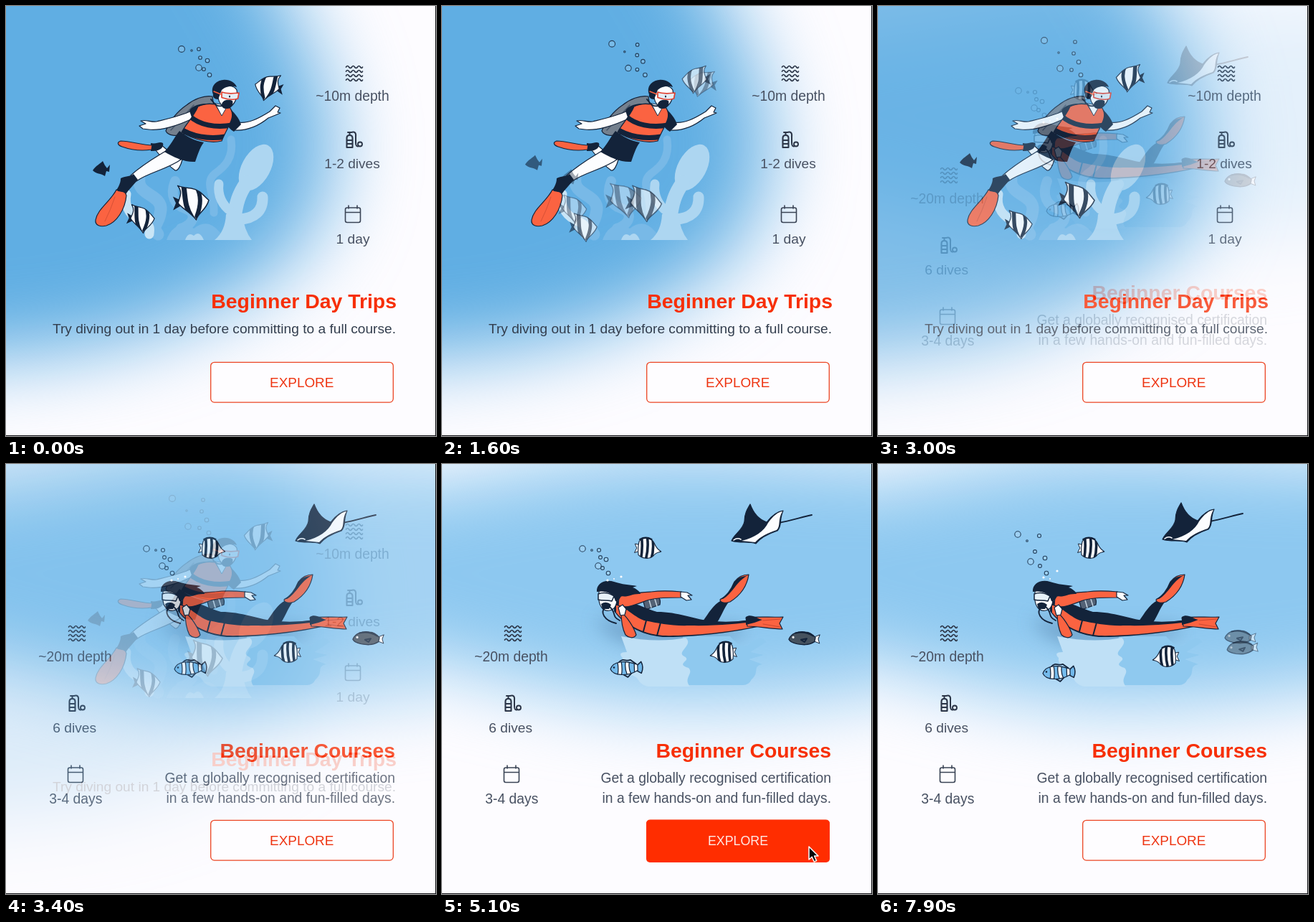
These frames come from a looping animation (600 by 599 pixels, 8 s). An HTML page with a canvas:

```html
<!DOCTYPE html>
<html lang="en">
<head>
<meta charset="utf-8">
<title>Dive trips</title>
<style>
html, body { margin: 0; width: 100%; height: 100%; overflow: hidden; background: #fdfcff; }
canvas { display: block; }
</style>
</head>
<body>
<canvas id="stage" width="600" height="599"></canvas>
<script>
const W = 600, H = 599, LOOP = 8000;
const NAVY = '#13233a', ORANGE = '#fb6341', RED = '#f72f05', WHITE = '#fcfdff', INK = '#485162';
const FONT = '"Liberation Sans", Arial, sans-serif';

const stage = document.getElementById('stage').getContext('2d');
const layer = () => Object.assign(document.createElement('canvas'), { width: W, height: H }).getContext('2d');

const clamp = v => Math.max(0, Math.min(1, v));
const lerp = (a, b, p) => a + (b - a) * p;
const ease = p => p * p * (3 - 2 * p);
const span = (t, a, b) => clamp((t - a) / (b - a));

function shape(c, d, fill, line, width = 1.2) {
  const path = new Path2D(d);
  if (fill) { c.fillStyle = fill; c.fill(path); }
  if (line) {
    c.strokeStyle = line;
    c.lineWidth = width;
    c.lineCap = c.lineJoin = 'round';
    c.stroke(path);
  }
}

function oval(c, x, y, rx, ry, fill, line, width = 1, turn = 0) {
  c.beginPath();
  c.ellipse(x, y, rx, ry, turn, 0, 7);
  if (fill) { c.fillStyle = fill; c.fill(); }
  if (line) { c.strokeStyle = line; c.lineWidth = width; c.stroke(); }
}

function text(c, s, x, y, size, color = INK, align = 'center', weight = 400) {
  c.font = `${weight} ${size}px ${FONT}`;
  c.textAlign = align;
  c.fillStyle = color;
  c.fillText(s, x, y);
}

function soft(c, d, color, blur) {
  c.save();
  c.filter = `blur(${blur}px)`;
  shape(c, d, color);
  c.restore();
}

function at(c, x, y, turn, sx, sy, alpha, draw) {
  if (alpha <= 0) return;
  c.save();
  c.globalAlpha = alpha;
  c.translate(x, y);
  c.rotate(turn);
  c.scale(sx, sy);
  draw(c);
  c.restore();
}

// ---------- interface ----------
function icons(c, dx, dy, tankDy) {
  c.save();
  c.translate(dx, dy);
  for (let row = 0; row < 4; row++) {
    shape(c, `M474.5,${85 + row * 6} q2,-3 4,0 t4,0 t4,0 t4,0 t4,0 t3,0`, null, '#2b3547', 1.7);
  }
  shape(c, 'M476,281 H492 Q494.5,281 494.5,283.5 V299 Q494.5,301.5 492,301.5 H476 Q473.5,301.5 473.5,299 V283.5 Q473.5,281 476,281 Z M473.5,287.5 H494.5 M478,278 V282 M490,278 V282', null, '#3a4455', 1.6);
  c.translate(0, tankDy);
  shape(c, 'M475.5,197 V184 Q475.5,180 479.5,180 Q483.5,180 483.5,184 V197 Z M476,187 H483 M476,192 H483', null, '#2b3547', 2.1);
  shape(c, 'M477,176 H482 M479.5,176 V180 M482,176 Q489,174 488,182 V190 Q488,197 492,195', null, '#2b3547', 2);
  oval(c, 494, 192.5, 3, 3, null, '#2b3547', 1.9);
  c.restore();
}

function button(c) {
  c.beginPath();
  c.roundRect(285.7, 496.3, 254.6, 55.8, 5);
  c.fillStyle = '#fefdff';
  c.fill();
  c.strokeStyle = '#ec4523';
  c.lineWidth = 1.3;
  c.stroke();
  text(c, 'EXPLORE', 412.7, 531.3, 18.9, '#ee3512');
}

function hotButton(c) {
  c.beginPath();
  c.roundRect(285, 495.5, 256, 59.5, 5);
  c.fillStyle = '#ff2d00';
  c.fill();
  text(c, 'EXPLORE', 413, 531.3, 17.8, '#ffe9e4');
}

function cursor(c, x, y) {
  at(c, x, y, 0, 1, 1, 1, () =>
    shape(c, 'M0,0 V18 L4.2,14.3 L7.2,21 L10.6,19.6 L7.6,13 H13 Z', '#060606', '#fff', 1.5));
}

function frameEdge(c) {
  c.fillStyle = '#15151a';
  c.fillRect(599, 0, 1, H);
  c.fillRect(0, 598, W, 1);
}

// ---------- day trip scene ----------
function reefA(c) {
  const dim = '#78b9e7', pale = '#add6f1';
  shape(c, 'M314,186 C318,212 305,224 291,234 C276,247 292,262 290,288', null, dim, 11);
  shape(c, 'M186,240 C182,264 218,262 216,284 S202,304 212,318', null, dim, 17);
  shape(c, 'M236,244 C228,264 236,278 250,282 C268,288 262,304 244,310', null, dim, 14);
  shape(c, 'M224,326 C232,304 248,300 262,310 Q282,294 299,316 V326 Z', dim);
  shape(c, 'M250,326 Q254,314 262,320 Q270,312 276,326 Z', pale);
  oval(c, 349, 225, 20, 35, pale, null, 1, 0.5);
  shape(c, 'M336,246 C326,260 320,274 318,302', null, pale, 20);
  shape(c, 'M297,248 C295,264 302,278 314,286', null, pale, 13);
  shape(c, 'M358,266 C359,286 346,296 326,297', null, pale, 15);
  shape(c, 'M291,326 Q306,314 307,290 H330 Q332,312 343,326 Z', pale);
  shape(c, 'M168,262 C164,282 176,294 190,300 S200,312 200,318', null, '#c9e5f6', 13);
}

function diverA(c) {
  shape(c, 'M223,174 C228,160 240,146 252,138 C262,130 276,124 288,126 L290,140 L250,178 C238,182 226,181 223,174 Z', '#74808e', NAVY);
  shape(c, 'M230,173 L262,138 M250,168 L270,142', null, '#46566a', 1.5);
  // rear leg
  shape(c, 'M216,193 C226,202 238,210 246,214 C244,222 240,230 236,229 C226,222 216,210 209,201 Z', WHITE, NAVY);
  shape(c, 'M202,191 C210,193 214,188 219,191 C221,197 214,203 202,202 Z', NAVY);
  shape(c, 'M204,194 C190,194 174,188 160,188 C154,190 156,194 162,196 C176,201 190,202 203,200 Z', ORANGE, NAVY);
  // front leg
  shape(c, 'M226,200 C214,208 194,218 174,236 L182,244 C198,232 224,228 244,214 Z', WHITE, NAVY);
  shape(c, 'M160,240 C168,236 174,238 178,234 L184,242 C176,252 168,258 165,267 L150,262 C156,254 160,248 160,240 Z', NAVY);
  shape(c, 'M154,256 C146,272 128,282 125,298 C124,306 132,308 140,306 C154,302 166,284 168,264 C166,256 160,260 154,256 Z', ORANGE, NAVY);
  shape(c, 'M152,266 Q146,284 138,300', null, '#cf4c33', 0.8);
  shape(c, 'M242,174 C252,182 264,188 276,190 C270,198 268,206 264,217 C250,218 234,211 221,203 C230,194 234,184 242,174 Z', NAVY);
  // arms
  shape(c, 'M259,146 C244,153 226,157 210,161 C202,162 196,158 188,160 L195,164 L186,167 L191,171 L199,172 C214,174 238,168 264,155 Z', WHITE, NAVY);
  shape(c, 'M318,173 C334,174 350,169 366,156 L376,152 L383,149 L379,148 L382,142 L376,139 L368,147 C352,157 338,164 324,162 Z', WHITE, NAVY);
  shape(c, 'M256,146 C260,137 276,135 290,136 L280,154 C270,152 264,156 259,155 Z', NAVY);
  shape(c, 'M308,140 C318,146 326,158 328,165 L318,175 C308,170 304,158 304,150 Z', NAVY);
  // vest
  const vest = 'M268,140 C276,136 286,136 292,137 L301,152 L309,138 C316,144 317,152 314,160 C310,170 304,180 301,188 C284,192 262,186 245,176 C250,166 262,154 268,140 Z';
  shape(c, vest, ORANGE, NAVY);
  c.save();
  c.clip(new Path2D(vest));
  shape(c, 'M256,153 C270,166 292,170 316,166 M242,170 C258,182 284,186 306,182', null, NAVY, 7);
  c.restore();
  shape(c, 'M292,136 L301,153 L309,139 Z', WHITE, NAVY, 0.8);
  // head
  shape(c, 'M297,116 C305,109 318,110 322,117 C324,126 319,140 309,142 C301,141 297,134 296,128 Z', WHITE, NAVY);
  shape(c, 'M289,123 C285,113 292,104 303,103 C312,102 320,107 322,113 C314,110 305,113 301,117 L296,130 C291,130 288,127 289,123 Z', NAVY);
  shape(c, 'M301,137 C303,130 311,130 316,132 C318,138 313,144 308,143 C303,143 301,141 301,137 Z', NAVY);
  shape(c, 'M301,120 C308,122.5 317,122 325,121 L323.5,129 C316,131.5 308,130 301,127.5 Z', '#e4eef6', '#e2402f', 1.7);
  shape(c, 'M290,119 L300,123', null, ORANGE, 1.5);
  oval(c, 312, 126, 1, 1.5, NAVY);
  shape(c, 'M302,139 C292,141 290,134 286,130', null, NAVY, 1.8);
}

function sceneA(c) {
  c.fillStyle = '#fdfcff';
  c.fillRect(0, 0, W, H);
  soft(c, 'M-220,-220 H260 C340,-80 452,60 456,200 C452,310 390,372 290,418 C210,456 110,498 -220,492 Z', '#60aee3', 56);
  reefA(c);
  diverA(c);
  icons(c, 0, 0, 0);
  text(c, '~10m depth', 483.5, 132, 19.3);
  text(c, '1-2 dives', 483, 226, 19.1);
  text(c, '1 day', 484, 331, 19.2);
  text(c, 'Beginner Day Trips', 545, 421, 28.4, RED, 'right', 700);
  text(c, 'Try diving out in 1 day before committing to a full course.', 544, 456, 19.15, '#333e4e', 'right');
  button(c);
  frameEdge(c);
}

// ---------- course scene ----------
function reefB(c) {
  soft(c, 'M215,215 C230,250 280,258 330,255 L420,238 L420,225 L300,225 Z', 'rgba(70,110,150,.4)', 12);
  shape(c, 'M336,240 H402 C414,254 424,258 432,248 Q446,238 452,248 L430,262 L449,266 L428,272 L447,279 C432,282 444,290 432,300 Q428,308 420,308 H330 Z', '#8fc9ef');
  shape(c, 'M250,240 Q300,250 340,242 C352,252 326,262 338,268 S324,278 344,284 C352,292 336,298 346,310 H288 C270,306 278,296 262,294 C270,284 250,284 252,270 Q244,262 258,262 Z', '#bfe0f6');
}

function diverB(c) {
  // raised leg
  shape(c, 'M364,219 C372,208 378,196 390,190 L401,191 C392,202 390,214 380,226 Z', NAVY);
  shape(c, 'M388,189 C398,184 404,174 408,164 C414,156 422,154 428,154 C426,168 418,182 402,192 C396,194 388,194 388,189 Z', ORANGE, NAVY);
  shape(c, 'M392,188 C406,180 410,164 427,155 C418,158 412,156 406,168 C402,178 396,184 388,188 Z', NAVY);
  // tank and body
  shape(c, 'M280,188 L300,184 Q306,188 304,196 L284,203 Z', '#536276', NAVY);
  shape(c, 'M288,186 L292,200 M296,185 L300,198', null, '#c4d3df', 1.5);
  shape(c, 'M240,191 C262,188 284,202 300,206 C330,206 350,216 372,218 C400,222 420,218 440,216 L440,227 C400,236 340,242 308,241 C276,238 254,224 240,205 Z', NAVY);
  shape(c, 'M243,197 C256,198 266,212 282,218 C304,222 320,226 346,225 C384,226 412,222 438,220 L438,226 C400,235 340,240 308,239 C278,236 258,224 243,207 Z', ORANGE);
  shape(c, 'M285,218 L281,233 M305,221 L300,239', null, NAVY, 2);
  shape(c, 'M424,214 C444,212 460,214 476,213 L471,222 L475,230 C460,230 440,226 426,226 Z', ORANGE, NAVY);
  shape(c, 'M424,213 C432,208 440,216 447,217 L436,221 L424,224 Z', NAVY);
  shape(c, 'M448,218 L472,216 M448,223 L472,227', null, '#bd412d', 0.8);
  // arms
  shape(c, 'M247,185 C258,180 276,179 292,178 C308,176 322,177 334,178 L334,186 C316,186 300,186 286,190 C270,196 256,202 246,197 Z', ORANGE, NAVY);
  shape(c, 'M333,178 L342,179 L349,183 L343,183 L348,189 L341,190 L333,185 Z', WHITE, NAVY);
  shape(c, 'M250,207 C258,212 268,228 271,238 C268,244 260,242 256,238 C252,230 250,218 250,207 Z', ORANGE, NAVY);
  shape(c, 'M246,200 L252,196 L257,202 L255,210 L249,211 Z', WHITE, NAVY);
  // head
  shape(c, 'M219,176 C224,170 238,172 243,182 C246,192 242,203 234,204 C225,206 220,198 219,190 Z', WHITE, NAVY);
  shape(c, 'M216,178 C215,166 228,160 240,164 C252,168 260,168 272,170 L266,172 C272,174 276,178 277,181 C266,180 260,186 250,184 C246,192 242,194 241,188 C238,180 228,176 216,178 Z', NAVY);
  shape(c, 'M218,181 C226,178 234,180 240,184 L237,191 C230,189 224,191 218,189 Z', '#e7f1f8', NAVY, 1.5);
  shape(c, 'M222,195 Q229,190 236,196 L233,202 L224,202 Z', NAVY);
  shape(c, 'M228,200 C220,206 226,218 243,222 M234,199 C244,208 236,212 248,218', null, NAVY, 1.8);
}

function sceneB(c) {
  c.fillStyle = '#fdfcff';
  c.fillRect(0, 0, W, H);
  soft(c, 'M-160,45 C60,30 150,-10 300,-15 S520,0 760,-5 V290 C560,320 450,335 340,335 C200,335 90,295 -160,240 Z', '#8dc8f0', 52);
  reefB(c);
  diverB(c);
  icons(c, -387, 142, 5);
  text(c, '~20m depth', 96.5, 275, 19.3);
  text(c, '6 dives', 95.7, 373.5, 19.2);
  text(c, '3-4 days', 97.3, 473, 19.3);
  text(c, 'Beginner Courses', 543, 409, 28.4, RED, 'right', 700);
  text(c, 'Get a globally recognised certification', 543, 444, 19.35, INK, 'right');
  text(c, 'in a few hands-on and fun-filled days.', 543, 472, 19.3, INK, 'right');
  button(c);
  frameEdge(c);
}

// ---------- animals, drawn around 0,0 ----------
function idol(c) {
  shape(c, 'M-14,-3 L-24,-8 L-20,1 L-24,11 L-13,5 Z', NAVY);
  const body = 'M26,-2 C20,-7 14,-17 2,-19 C-4,-20 -10,-20 -17,-23 C-10,-14 -14,-8 -17,1 C-12,9 -2,12 8,25 C10,16 22,12 26,-2 Z';
  shape(c, body, WHITE);
  c.save();
  c.clip(new Path2D(body));
  shape(c, 'M-9,-24 C-6,-8 -9,4 2,22', null, NAVY, 7);
  shape(c, 'M9,-22 C16,-8 15,4 9,20', null, NAVY, 6);
  c.restore();
  shape(c, body, null, NAVY, 1.5);
}

function smallFish(c) {
  shape(c, 'M-12,2 C-7,-5 -2,-7 2,-11 L5,-5 L8,-1 L12,-6 L11,4 L7,3 L5,10 C0,6 -8,7 -12,2 Z', NAVY);
}

function banded(c) {
  shape(c, 'M-11,-4 L-19,-5 L-16,1 L-19,8 L-11,5 Z', WHITE, NAVY, 1);
  const body = 'M-13,-9 C-8,-17 4,-16 9,-8 C12,-2 16,2 20,4 C15,6 12,6 9,11 C4,17 -8,16 -13,11 Q-15,0 -13,-9 Z';
  shape(c, body, WHITE);
  c.save();
  c.clip(new Path2D(body));
  shape(c, 'M-10,-16 Q-7,0 -9,16 M-2,-18 Q2,0 -2,18 M6,-16 Q10,2 6,16', null, NAVY, 3.8);
  c.restore();
  shape(c, body, null, NAVY, 1.2);
  shape(c, 'M-12,-12 Q-4,-17 5,-13', null, NAVY, 2.5);
}

function clown(c) {
  shape(c, 'M14,-2 L21,-8 Q25,0 21,8 L14,4 Z', '#71b8ea', NAVY, 1.5);
  shape(c, 'M-10,-8 C-4,-15 0,-8 6,-11 L14,-5 M-6,8 L2,13 L8,7', '#a9d4f1', NAVY, 1.8);
  const body = 'M-22,1 C-18,-10 -2,-11 16,-4 V4 C2,12 -18,11 -22,1 Z';
  const bands = 'M-10,-12 Q-7,0 -10,12 M3,-12 Q-1,0 5,12 M14,-8 V8';
  shape(c, body, '#75bbec');
  c.save();
  c.clip(new Path2D(body));
  shape(c, bands, null, NAVY, 6.5);
  shape(c, bands, null, WHITE, 4);
  c.restore();
  shape(c, body, null, NAVY, 1.2);
  oval(c, -17, -1, 1.3, 1.3, NAVY);
}

function tang(c) {
  shape(c, 'M13,-2 L22,-6 L20,0 L22,6 L13,3 Z', WHITE, NAVY, 1);
  shape(c, 'M-21,2 C-18,-7 -8,-10 2,-9 C9,-9 13,-5 16,-2 L15,4 C6,10 -2,9 -9,8 C-14,7 -19,6 -21,2 Z', '#46525f', NAVY, 1.3);
  shape(c, 'M-12,-7 Q0,-11 13,-4 M-4,2 L4,0 L1,5 Z', null, NAVY, 2);
  oval(c, -15, -1, 1.6, 1.6, WHITE);
}

function manta(c) {
  shape(c, 'M470,82 C486,79 502,74 516,71', null, NAVY, 1.8);
  shape(c, 'M404,107 C408,97 420,92 422,80 C422,69 426,63 430,56 C434,67 441,77 453,81 C460,72 468,66 476,65 C470,78 475,86 468,93 C456,97 445,102 438,111 C428,107 416,111 404,107 Z', NAVY, NAVY);
  shape(c, 'M418,107 C436,103 450,93 455,82 C462,72 469,67 475,66 C468,78 473,86 467,92 C455,96 444,101 437,109 Z', WHITE);
  shape(c, 'M407,106 Q412,102 417,105', null, WHITE, 1.6);
}

// start and end x,y then radius
const bubblesA = [
  [245, 60, 232, 48, 4.4], [259, 62, 252, 65, 1.2], [269, 60, 275, 50, 2.3], [271, 72, 273, 66, 2.3],
  [281, 76, 280, 78, 2.8], [269, 86, 254, 87, 4.2], [276, 88, 270, 89, 2.3], [284, 96, 283, 96, 2.8]
];
const bubblesB = [
  [196, 118, 195, 98, 4.2], [209, 120, 208, 107, 1.3], [219, 120, 225, 100, 2.5], [221, 130, 219, 122, 2.4],
  [229, 133, 233, 131, 2.8], [218, 142, 213, 136, 4.2], [224, 145, 226, 142, 2.4], [232, 152, 235, 152, 2.8]
];

function bubbles(c, list, p) {
  for (const [x0, y0, x1, y1, r] of list) {
    oval(c, lerp(x0, x1, p), lerp(y0, y1, p), r, r, 'rgba(220,240,255,.2)', '#24405c', 1.1);
  }
}

// leaving from -> to, arriving from -> to, turns, scale
const shoal = [
  { draw: idol, out: [368, 113, 363, 104], into: [360, 105, 353, 100], turn: [0.12, -0.05], sx: -0.79, sy: 0.78 },
  { draw: idol, out: [257, 273, 249, 268], into: [287, 282, 276, 270], turn: [-0.02, 0.1], sx: 1, sy: 1 },
  { draw: idol, out: [187, 296, 178, 274], into: [198, 314, 195, 304], turn: [0.08, 0.06], sx: 0.77, sy: 0.8 },
  { draw: smallFish, out: [133, 227, 208, 246], into: [131, 223, 126, 216], turn: [0, 0], sx: 1, sy: 1 }
];

function liveA(c, t) {
  const p = ease(span(t, 1100, 1980));
  bubbles(c, bubblesA, p);
  for (const f of shoal) {
    const [a, b] = [f.out, f.into];
    at(c, lerp(a[0], a[2], p), lerp(a[1], a[3], p), f.turn[0], f.sx, f.sy, 1 - p, f.draw);
    at(c, lerp(b[0], b[2], p), lerp(b[1], b[3], p), f.turn[1], f.sx, f.sy, p, f.draw);
  }
}

function liveB(c, t) {
  const p = ease(span(t, 7300, 7900)), q = span(t, 7680, 8120);
  bubbles(c, bubblesB, p);
  oval(c, 231, lerp(162, 158, p), 1.6, 1.6, WHITE);
  oval(c, 250, lerp(157, 149, p), 1.6, 1.6, WHITE);
  oval(c, 240, 160, 1, 1, WHITE);
  at(c, -7 * p, -2 * p, 0, 1, 1, 1, manta);
  at(c, lerp(287, 297, p), 117, 0.06, 0.95, 0.95, 1, banded);
  at(c, lerp(393, 402, p), lerp(262, 268, p), -0.06, -0.95, 0.95, 1, banded);
  at(c, lerp(257, 252, p), lerp(284, 290, p), -0.03, 1, 1, 1, clown);
  at(c, 505, lerp(243, 241, p), 0.04, 1, 1, 1 - q, tang);
  at(c, 508, 256, -0.04, 1, 1, q, tang);

  const come = 1 - (1 - span(t, 4050, 4550)) ** 2, go = span(t, 5800, 6500) ** 2;
  const x = lerp(506, 512, come) + 8 * go, y = lerp(604, 533, come) + 72 * go;
  if (y < 553) hotButton(c);
  if (t > 4050 && y < 603) cursor(c, x, y);
  frameEdge(c);
}

const backA = layer(), backB = layer(), blend = layer();
sceneA(backA);
sceneB(backB);

function render(t) {
  const mix = span(t, 2850, 3550);
  if (mix < 1) {
    stage.drawImage(backA.canvas, 0, 0);
    liveA(stage, t);
  }
  if (mix > 0) {
    blend.drawImage(backB.canvas, 0, 0);
    liveB(blend, t);
    stage.globalAlpha = mix;
    stage.drawImage(blend.canvas, 0, 0);
    stage.globalAlpha = 1;
  }
}

const start = performance.now();
function tick() {
  render((performance.now() - start) % LOOP);
  requestAnimationFrame(tick);
}
tick();
</script>
</body>
</html>
```
